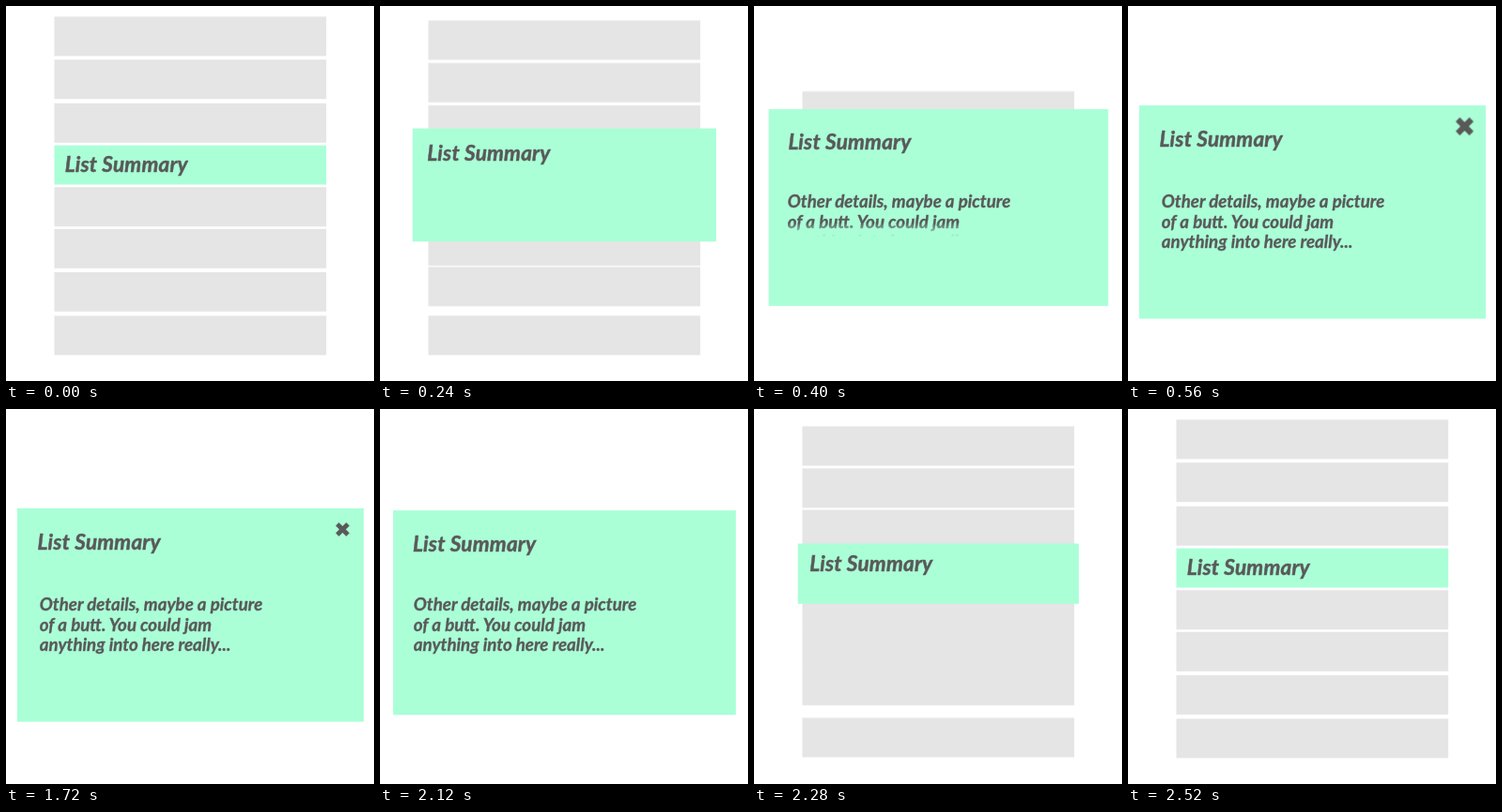
Animation, 392 px wide and 400 px high, one loop 3160 ms. Source, as an HTML page:

```html
<!DOCTYPE html>
<html lang="en">
<head>
<meta charset="utf-8">
<title>Expanding list item</title>
<style>
  html, body { margin: 0; width: 100%; height: 100%; overflow: hidden; background: #fff; }
  svg { display: block; width: 392px; height: 400px; }
  text {
    font: italic 700 18.7px Lato, sans-serif;
    fill: #595959; stroke: #595959; stroke-width: .35px;
  }

  /* The script sets --t, so every part shows the pose of that time. */
  .row, .card, .title, .wipe, .close {
    animation: 3160ms linear calc(var(--t, 0) * -1ms) infinite paused;
  }
  .row { x: 51.5px; width: 289.7px; height: 42px; fill: #e5e5e5; animation-name: gather; }
  .row.last { animation-name: gather-last; }
  .card { fill: #aaffd7; animation-name: grow; }
  .title { font-size: 22.5px; letter-spacing: .22px; stroke-width: .5px; animation-name: shift; }
  .wipe { animation-name: reveal; }
  .close { fill: #595959; animation-name: pop; }

  @keyframes gather {
    0%, 6.487% { transform: none; animation-timing-function: cubic-bezier(.333, 0, .667, 1); }
    16.456%, 67.089% { transform: translateY(var(--d)); animation-timing-function: cubic-bezier(.16, 1, .3, 1); }
    79.747%, 100% { transform: none; }
  }
  @keyframes gather-last {
    0%, 7.848% { transform: none; animation-timing-function: cubic-bezier(.333, 0, .667, 1); }
    16.709%, 66.93% { transform: translateY(var(--d)); animation-timing-function: cubic-bezier(.16, 1, .3, 1); }
    75.316%, 100% { transform: none; }
  }
  @keyframes grow {
    0%, 1.266% {
      x: 51.5px; y: 148.7px; width: 289.7px; height: 41.8px;
      animation-timing-function: cubic-bezier(.333, 0, .667, 1);
    }
    15.348%, 65.823% {
      x: 11.9px; y: 106px; width: 369.2px; height: 227.6px;
      animation-timing-function: cubic-bezier(.34, 0, .095, 1);
    }
    77.215%, 100% { x: 51.5px; y: 148.7px; width: 289.7px; height: 41.8px; }
  }
  @keyframes shift {
    0%, 1.266% { transform: translate(62.7px, 176.7px); animation-timing-function: cubic-bezier(.333, 0, .667, 1); }
    15.348%, 65.823% { transform: translate(33.6px, 150.2px); animation-timing-function: cubic-bezier(.34, 0, .095, 1); }
    77.215%, 100% { transform: translate(62.7px, 176.7px); }
  }
  @keyframes reveal {
    0%, 8.861% { transform: none; }
    15.19%, 67.089% { transform: translateY(84px); }
    70.886%, 100% { transform: none; }
  }
  @keyframes pop {
    0%, 13.924% { transform: scale(0); }
    17.722% { transform: scale(1); animation-timing-function: step-end; }
    54.11% { transform: scale(.77); animation-timing-function: step-end; }
    55.38% { transform: scale(1); animation-timing-function: step-end; }
    66.46%, 100% { transform: scale(0); }
  }
</style>
</head>
<body>
<svg viewBox="0 0 392 400">
  <defs>
    <linearGradient id="fade" x2="0" y2="1">
      <stop offset=".95" stop-color="#fff"/>
      <stop offset="1" stop-color="#fff" stop-opacity="0"/>
    </linearGradient>
    <mask id="wipe" maskUnits="userSpaceOnUse" x="0" y="0" width="392" height="400">
      <rect class="wipe" y="-104" width="392" height="300" fill="url(#fade)"/>
    </mask>
  </defs>

  <rect class="row" y="11.4" style="--d: 118px"/>
  <rect class="row" y="57.2" style="--d: 102px"/>
  <rect class="row" y="103.8" style="--d: 63px"/>
  <rect class="row" y="193.2" style="--d: -32px"/>
  <rect class="row" y="237.8" style="--d: -82px"/>
  <rect class="row" y="283.9" style="--d: -163px"/>
  <rect class="row last" y="330.4" style="--d: -100px"/>

  <rect class="card"/>
  <text class="title">List Summary</text>
  <g mask="url(#wipe)">
    <text x="35.8" y="214.6">Other details, maybe a picture</text>
    <text x="35.8" y="236.6">of a butt. You could jam</text>
    <text x="35.8" y="258.4">anything into here really...</text>
  </g>
  <g transform="translate(358.5 128.4)">
    <g class="close">
      <rect x="-10.4" y="-3.2" width="20.8" height="6.4" rx=".3" transform="rotate(45)"/>
      <rect x="-10.4" y="-3.2" width="20.8" height="6.4" rx=".3" transform="rotate(-45)"/>
    </g>
  </g>
</svg>
<script>
  const LOOP = 3160, STEP = 40;
  const root = document.documentElement;

  function draw() {
    const t = performance.now() % LOOP;
    root.style.setProperty('--t', Math.floor(t / STEP) * STEP);
    requestAnimationFrame(draw);
  }
  draw();
</script>
</body>
</html>
```
